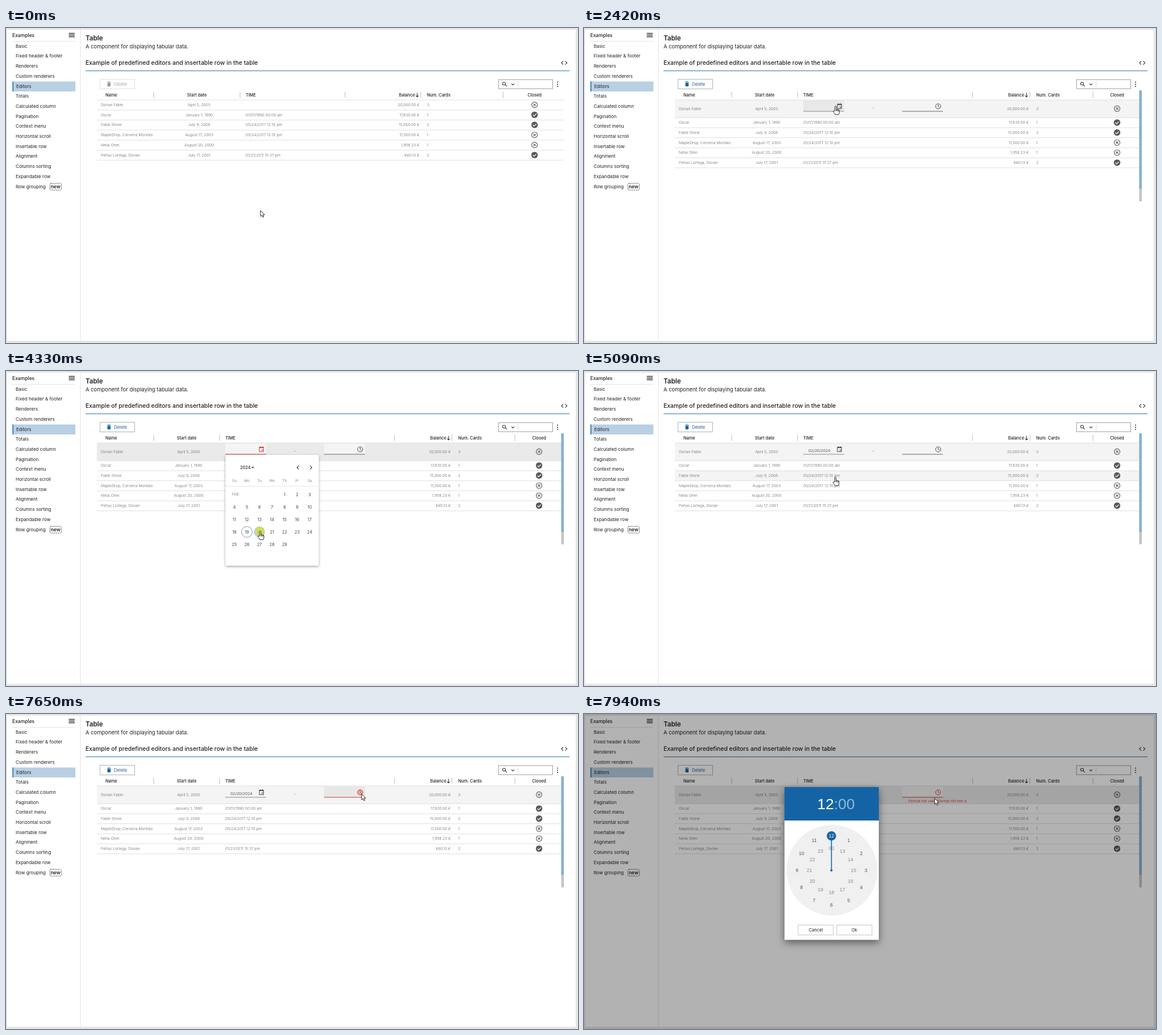
An HTML page for the animation above (8000 ms loop, 1007 by 556 pixels).

```html
<!DOCTYPE html>
<html lang="en">
<head>
<meta charset="utf-8">
<title>Table editors</title>
<style>
  html, body { margin: 0; width: 100%; height: 100%; overflow: hidden; background: #fff; }
  svg { display: block; width: 1007px; height: 556px; font-family: Inter, sans-serif; }
  text { white-space: pre; fill: #222; }
  .h1 { font-size: 11.6px; font-weight: 600; }
  .h2 { font-size: 10.45px; font-weight: 500; }
  .lead { font-size: 9.45px; }
  .nav { font-size: 8.1px; }
  .navhead { font-size: 8.5px; font-weight: 500; }
  .badge { font-size: 8.5px; font-weight: 600; }
  .th { font-size: 7.4px; font-weight: 500; }
  .td { font-size: 6.7px; font-weight: 300; fill: #666; }
  .val { font-size: 6.8px; fill: #555; }
  .btn { font-size: 7.7px; }
  .error { font-size: 6.4px; fill: #d5443a; }
  .year { font-size: 7.4px; font-weight: 500; }
  .week { font-size: 6.3px; fill: #888; }
  .day { font-size: 7.3px; fill: #444; }
  .clock { font: 8.6px "Liberation Sans", Arial, sans-serif; fill: #555; }
  .inner { fill: #8a8a8a; }
  .big { font: 26.5px "Liberation Sans", Arial, sans-serif; fill: #fff; }
  .icon { fill: none; stroke: #333; stroke-width: 1.1; }
</style>
</head>
<body>
<svg id="stage" viewBox="0 0 1007 556"></svg>
<script>
const LOOP = 8000, TICK = 1000 / 15;
const BLUE = '#1464a5', PALE = '#b8cfe4', RED = '#d5392e';

const text = (x, y, str, cls, anchor = 'start', extra = '') =>
  `<text x="${x}" y="${y}" dy=".36em" class="${cls}" text-anchor="${anchor}" ${extra}>${str}</text>`;
const rect = (x, y, w, h, fill, extra = '') =>
  `<rect x="${x}" y="${y}" width="${w}" height="${h}" fill="${fill}" ${extra}/>`;
const circle = (x, y, r, fill, extra = '') =>
  `<circle cx="${x}" cy="${y}" r="${r}" fill="${fill}" ${extra}/>`;
const path = (d, extra = 'class="icon"') => `<path d="${d}" ${extra}/>`;
const group = (id, body, extra = '') => `<g id="${id}" ${extra}>${body}</g>`;

const nav = ['Basic', 'Fixed header &amp; footer', 'Renderers', 'Custom renderers', 'Editors', 'Totals',
  'Calculated column', 'Pagination', 'Context menu', 'Horizontal scroll', 'Insertable row', 'Alignment',
  'Columns sorting', 'Expandable row', 'Row grouping'];

const rows = [
  ['Dorian Fable', 'April 5, 2003', '', '20,000.00 €', 3, false],
  ['Oscar', 'January 1, 1990', '01/01/1990 00:00 am', '17,835.00 €', 1, true],
  ['Fable Stone', 'July 9, 2008', '05/24/2017 12:10 pm', '15,000.00 €', 2, true],
  ['MapleDrop, Cervena Montalo', 'August 17, 2003', '05/24/2017 12:10 pm', '11,500.00 €', 1, false],
  ['Nelia Oren', 'August 20, 2000', '', '1,958.23 €', 1, false],
  ['Peñas Lortega, Dorian', 'July 17, 2001', '01/21/2011 15:37 pm', '660.13 €', 2, true],
];

const viewing = { first: 17.75, date: 340, dateHead: 336, time: 422, balance: 728, cards: 741, closed: 930.5,
  right: 982, bars: [260, 412, 597, 730, 875] };
const editing = { first: 31.3, date: 321.5, dateHead: 318, time: 386, balance: 783, cards: 796, closed: 938.5,
  right: 977, bars: [260, 376, 684, 785, 896] };

const rowTop = (layout, i) => i ? 127 + layout.first + (i - 1) * 17.7 : 127;
const rowHeight = (layout, i) => i ? 17.7 : layout.first;

function shell() {
  const items = nav.map((label, i) =>
    text(i === 4 ? 18 : 17, 31.8 + 17.7 * i + (i === 14 ? .7 : 0), label, 'nav')).join('');
  return rect(0, 0, 1007, 556, '#e6e6e6') + rect(2, 3, 1001, 549, '#fff') +
    rect(130.5, 3, 1, 549, '#e2e2e2') + text(11, 12.7, 'Examples', 'navhead') +
    path('M110.5 9.5h10.5M110.5 12.5h10.5M110.5 15.5h10.5', 'class="icon" style="stroke-width:1.3"') +
    rect(11, 23, 111, 1, '#e2e2e2') + rect(11.5, 94.4, 110.7, 17.6, PALE) + rect(11.5, 94.4, 1.4, 17.6, BLUE) + items +
    text(87.3, 280, 'new', 'badge', 'middle') +
    rect(77.2, 274.2, 20.4, 11.8, 'none', 'rx="2" stroke="#333" stroke-width=".9" stroke-dasharray="2 1.2"') +
    text(140, 18.3, 'Table', 'h1') + text(140, 32.5, 'A component for displaying tabular data.', 'lead') +
    text(140, 61.7, 'Example of predefined editors and insertable row in the table', 'h2') +
    rect(140, 75, 852, 1.1, '#3d7fae') + path('M981 58.3l-3.2 3.2 3.2 3.2M984.5 58.3l3.2 3.2-3.2 3.2');
}

function toolbar() {
  return rect(867.1, 91.1, 95.3, 16, '#fff', 'stroke="#999"') +
    circle(876.8, 98.3, 2.5, 'none', 'class="icon"') + path('M878.7 100.2l3 3') +
    path('M890 98.2l2.4 2.4 2.4-2.4') + rect(901, 94, 1, 11, '#ddd') +
    [95.5, 99.3, 103.1].map(y => circle(971, y, 1.1, '#444')).join('');
}

function deleteButton(enabled) {
  const ink = enabled ? '#2f5d94' : '#aaa';
  return rect(165.5, 90.5, 61, 17, '#fff', `stroke="${enabled ? '#a9b3be' : '#e0e0e0'}"`) +
    path('M178 95.3h2l.5-.8h1.6l.5.8h2v1h-6.6zM178.5 97h5.6v5q0 1-1 1h-3.6q-1 0-1-1z',
      `fill="${enabled ? BLUE : '#999'}"`) +
    text(190, 99.2, 'Delete', 'btn', 'start', `style="fill:${ink}"`);
}

function closedMark(x, y, on) {
  return on
    ? circle(x, y, 5.7, '#5a5a5a') + path(`M${x - 3} ${y}l2.2 2.2 4-4`, 'fill="none" stroke="#fff" stroke-width="1.2"')
    : circle(x, y, 5, 'none', 'stroke="#555" stroke-width="1.1"') +
      path(`M${x - 2} ${y - 2}l4 4m0-4l-4 4`, 'stroke="#555" stroke-width="1.1"');
}

function table(l) {
  const head = text(175, 118, 'Name', 'th') + text(l.dateHead, 118, 'Start date', 'th', 'middle') +
    text(l.time, 118, 'TIME', 'th') + text(l.balance - 8, 118, 'Balance', 'th', 'end') +
    path(`M${l.balance - 4} 114.5v7m-2.3-2.2l2.3 2.3 2.3-2.3`) + text(l.cards, 118, 'Num. Cards', 'th') +
    text(l.closed, 118, 'Closed', 'th', 'middle') + l.bars.map(x => rect(x - .5, 112.5, 1, 11, '#bbb')).join('');
  const body = rows.map(([name, date, time, balance, cards, closed], i) => {
    const y = rowTop(l, i) + rowHeight(l, i) / 2 - .3;
    return text(167, y, name, 'td') + text(l.date, y, date, 'td', 'middle') + text(l.time, y, time, 'td') +
      text(l.balance, y, balance, 'td', 'end') + text(l.cards, y, cards, 'td') + closedMark(l.closed, y, closed) +
      rect(160, rowTop(l, i + 1) - .5, l.right - 160, 1, '#dfdfdf');
  }).join('');
  return head + rect(160, 126.5, l.right - 160, 1, '#dfdfdf') + body;
}

function editors() {
  return rect(386, 128, 72, 19, '#f4f4f4', 'id="dateField"') + rect(386, 146.5, 72, 1, '#888', 'id="dateLine"') +
    rect(560, 128, 72, 19, '#f4f4f4', 'id="timeField"') + rect(560, 146.5, 72, 1, '#666', 'id="timeLine"') +
    group('dateIcon', path('M446 134.4h7.4v8h-7.4zM446 135.4h7.4M447.7 133v1.4M451.7 133v1.4',
      'fill="none" stroke-width="1"') + path('M450.2 138.6h2v2h-2z', 'stroke="none"')) +
    circle(623.5, 138.3, 5.2, '#dcb5af', 'id="ripple"') +
    group('timeIcon', circle(623.5, 138.3, 4.5, 'none') + path('M623.5 135.3v3.2l2.2 1.4', ''),
      'fill="none" stroke-width="1"') +
    text(509, 142, '–', 'td', 'middle') + text(395, 140.8, '02/20/2024', 'val', 'start', 'id="dateText"') +
    text(571, 154, 'Format not valid (format HH:mm a', 'error', 'start', 'id="error"');
}

const dayX = col => 402 + 22.1 * col, dayY = row => 218 + 22 * row;

function calendar() {
  const week = ['Su', 'Mo', 'Tu', 'We', 'Th', 'Fr', 'Sa'].map((d, i) => text(dayX(i), 193.7, d, 'week', 'middle'));
  const days = Array.from({ length: 29 }, (_, i) =>
    text(dayX((i + 4) % 7), dayY(Math.floor((i + 4) / 7)), i + 1, 'day', 'middle'));
  return rect(386.5, 148, 164, 195.5, '#fff', 'rx="2" filter="url(#shadow)"') +
    text(412, 170.5, '2024', 'year') + path('M431.7 169.2h5.4l-2.7 2.8z', 'fill="#444"') +
    path('M515.5 167.3l-3.2 3.2 3.2 3.2M535.2 167.3l3.2 3.2-3.2 3.2') + week.join('') +
    rect(387, 202.8, 163, 1, '#e4e4e4') + text(398, 218, 'FEB', 'week') +
    circle(0, 0, 9.7, PALE, 'id="active"') +
    circle(dayX(1), dayY(3), 9.5, 'none', 'stroke="#7f8b97" stroke-width=".9"') + days.join('');
}

function clockDialog() {
  const cx = 435.6, cy = 276;
  const spot = (hour, r, label, cls) => {
    const a = hour * Math.PI / 6;
    return text(cx + r * Math.sin(a), cy - r * Math.cos(a), label, cls, 'middle');
  };
  let hours = '';
  for (let h = 1; h <= 12; h++)
    hours += (h < 12 ? spot(h, 60.8, h, 'clock') : '') + spot(h, 38.8, h < 12 ? h + 12 : '00', 'clock inner');
  const button = (x, label) => rect(x, 372.5, 62, 17.5, '#fff', 'stroke="#c4c4c4"') +
    text(x + 31, 381, label, 'btn', 'middle');
  return rect(353, 129, 166, 269.5, '#fff', 'filter="url(#deep)"') + rect(353, 129, 166, 59, BLUE) +
    text(410.5, 158.5, '12<tspan fill-opacity=".55">:00</tspan>', 'big') +
    circle(436.6, 275.7, 80, '#f0f0f0') + hours + rect(cx - .8, 215, 1.6, 61, BLUE) +
    circle(cx, cy, 2, BLUE) + circle(cx, 215.3, 8.2, BLUE) +
    text(cx, 215.3, '12', 'clock', 'middle', 'style="fill:#fff"') + button(377, 'Cancel') + button(445, 'Ok');
}

const pen = 'fill="#fff" stroke="#111" stroke-width=".9" stroke-linejoin="round"';
const stage = document.getElementById('stage');
stage.innerHTML = `<defs>
    <filter id="shadow" x="-10%" y="-10%" width="120%" height="120%"><feDropShadow dx="0" dy="1.5" stdDeviation="2" flood-opacity=".4"/></filter>
    <filter id="deep" x="-20%" y="-20%" width="140%" height="140%"><feDropShadow dx="0" dy="5" stdDeviation="7" flood-opacity=".5"/></filter>
  </defs>` + shell() + toolbar() + rect(160, 0, 822, 17, '#f4f4f4', 'id="hover"') +
  group('viewMode', deleteButton(false) + table(viewing)) +
  group('editMode', rect(160, 127, 817, editing.first, '#f4f4f4', 'id="editRow"') + deleteButton(true) + table(editing) +
    rect(977.5, 110, 4.5, 196, '#c4c4c4') + rect(977.5, 110, 4.5, 174, '#85b1d2') + editors()) +
  group('calendar', calendar()) + rect(0, 0, 1007, 556, '#000', 'id="backdrop" opacity=".3"') +
  group('dialog', clockDialog()) + circle(0, 0, 8, '#d3df45', 'id="click" opacity=".85"') +
  group('arrow', path('M0 0V10.6L2.5 8.4 4.1 12 5.8 11.2 4.3 7.7H7.4Z', pen)) +
  group('hand', path('M-1.2 8.5V1.2a1.2 1.2 0 0 1 2.4 0V6q1-1 2 .2q1-.8 2 .4q1.3-.4 1.3 1.2V11q0 2-1.2 3.8H-.8' +
    'Q-1.6 12.6-4 9.8q-.6-1.6 1-1.5z', pen) + path('M1.2 6v3M3.2 6.3v2.8M5.2 6.7v2.5', pen));

const el = {};
stage.querySelectorAll('[id]').forEach(node => el[node.id] = node);
const show = (id, on) => { el[id].style.display = on ? '' : 'none'; };
const set = (id, attrs) => { for (const k in attrs) el[id].setAttribute(k, attrs[k]); };

// time, x, y, ease-out power
const route = [[0, 448, 322], [580, 448, 322], [1680, 438.5, 137, 2], [2150, 438.5, 137], [2920, 452, 140],
  [3320, 452.5, 140], [3800, 455, 300, 1.5], [4130, 447.5, 283, 2], [4740, 447.5, 283], [5510, 440, 140, 2],
  [6000, 578.5, 137, 1.3], [6350, 620, 136, 2], [6700, 622, 135], [6970, 622, 135], [7650, 626, 141, 2],
  [7720, 626, 141], [7940, 617, 149], [8001, 617, 149]];
const clicks = [1880, 3050, 4330, 7510];

function cursorAt(t) {
  const i = route.findIndex(key => key[0] > t);
  const [t0, x0, y0] = route[i - 1], [t1, x1, y1, power = 1] = route[i];
  const p = 1 - (1 - (t - t0) / (t1 - t0)) ** power;
  return [x0 + (x1 - x0) * p, y0 + (y1 - y0) * p];
}

function render(t) {
  const [x, y] = cursorAt(Math.floor((t + 25) / TICK) * TICK);
  const edit = t >= 2150, calOpen = t >= 3115 && t < 4535, modal = t >= 7715;
  const layout = edit ? editing : viewing;
  const fade = (start, span) => Math.min(1, (Math.floor((t - start) / 70) + 1) / span);

  show('viewMode', !edit);
  show('editMode', edit);
  const row = rows.findIndex((_, i) => y >= rowTop(layout, i) - 3 && y < rowTop(layout, i + 1) - 3);
  show('hover', row >= 0 && !calOpen && !modal);
  if (row >= 0) set('hover', { y: rowTop(layout, row), height: rowHeight(layout, row), width: layout.right - 160 });
  set('editRow', { fill: (t >= 3115 && t < 4740) || modal ? '#eaeaea' : '#f4f4f4' });

  const inField = y > 127 && y < 147 && !calOpen && !modal;
  const timeRed = t >= 7575;
  set('dateField', { fill: inField && x > 386 && x < 458 ? '#e8e8e8' : '#f4f4f4' });
  set('timeField', { fill: inField && x > 560 ? '#e8e8e8' : '#f4f4f4' });
  set('dateLine', { fill: calOpen ? RED : '#888' });
  set('timeLine', { fill: timeRed ? RED : '#666' });
  set('dateIcon', { stroke: calOpen ? RED : '#444', fill: calOpen ? RED : '#444' });
  set('timeIcon', { stroke: timeRed ? RED : '#444' });
  show('ripple', timeRed && !modal);
  show('dateText', t >= 4395);
  show('error', t >= 7785);

  show('calendar', calOpen);
  set('calendar', { opacity: t < 4395 ? fade(3115, 3) : 1 - fade(4395, 3) });
  const onDays = y > 207;
  set('active', { cx: dayX(onDays ? Math.round((x - 402) / 22.1) : 1), cy: dayY(onDays ? Math.round((y - 218) / 22) : 3) });

  show('backdrop', modal);
  show('dialog', modal);
  if (modal) {
    const p = fade(7715, 4), s = .7 + .3 * p;
    set('dialog', { opacity: p, transform: `translate(436 263.5) scale(${s}) translate(-436 -263.5)` });
  }

  const onIcon = edit && y < 150 && ((x > 444 && x < 458) || x > 612);
  const onRows = y < (edit ? 247 : 233) && !onIcon;
  const hand = !modal && (t >= 3115 && t < 4740 ? onDays : onRows);
  const at = { transform: `translate(${x} ${y})` };
  set('hand', at);
  set('arrow', at);
  set('click', at);
  show('hand', hand);
  show('arrow', !hand);
  show('click', clicks.some(c => t >= c && t < c + 70));
}

const start = performance.now();
function frame() {
  render((performance.now() - start) % LOOP);
  requestAnimationFrame(frame);
}
frame();
</script>
</body>
</html>
```
